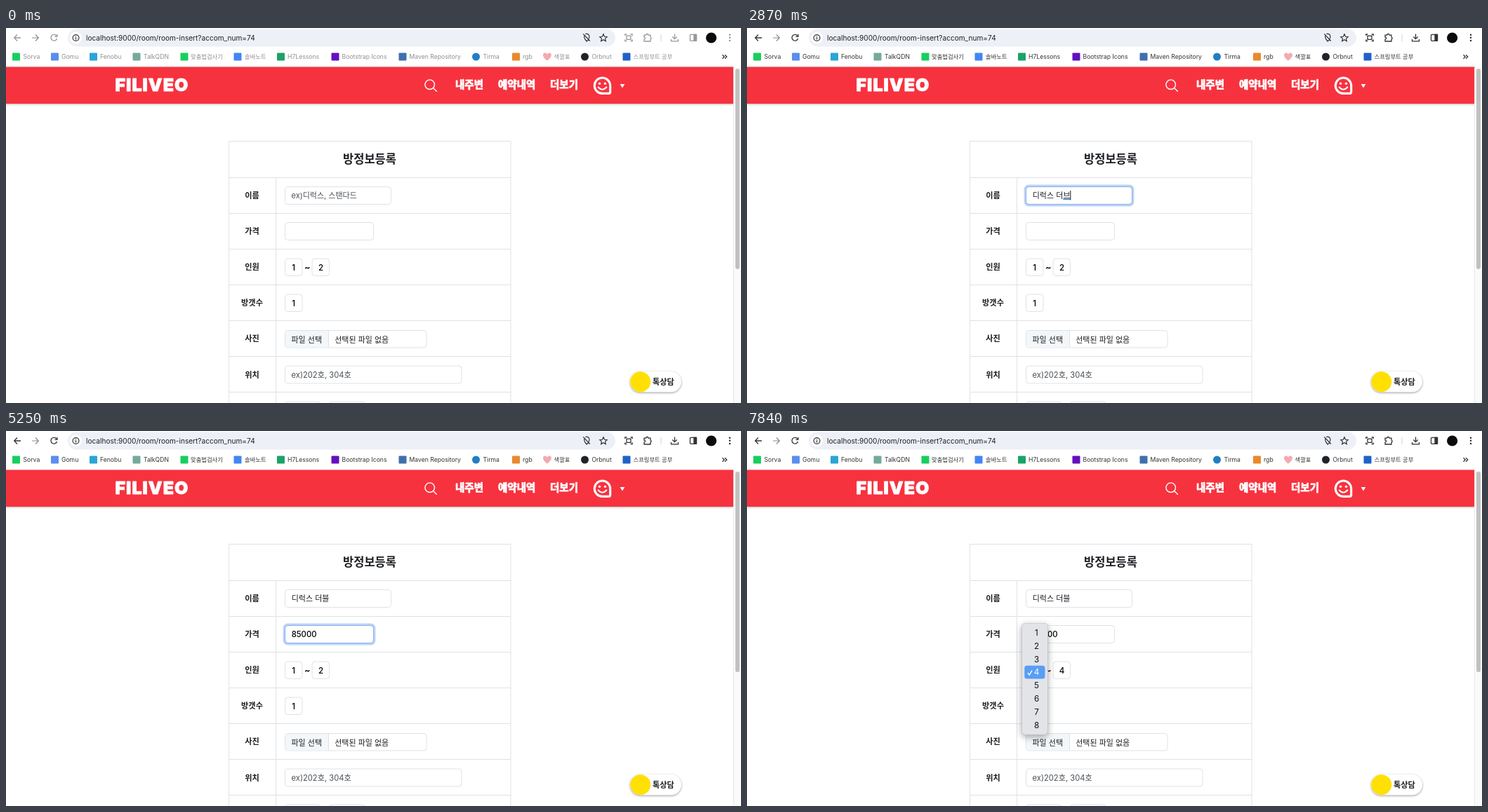
An HTML page for the animation above (8000 ms loop, 1047 px wide and 535 px high).

```html
<!DOCTYPE html>
<html lang="ko">
<head>
<meta charset="utf-8">
<title>방정보등록</title>
<style>
  html, body { margin: 0; width: 100%; height: 100%; overflow: hidden; background: #fff; }
  svg { display: block; width: 100%; height: 100%; font-family: Inter, 'Noto Sans CJK KR', 'Noto Sans CJK', sans-serif; }
  text { white-space: pre; }
</style>
</head>
<body>
<svg id="stage" viewBox="0 0 1047 535"></svg>
<script>
const LOOP = 8000;
const LINE = '#dee2e6', INK = '#1b1e22', HINT = '#4b5055';

// Markup helpers
const attrs = o => Object.entries(o).map(([k, v]) => ` ${k}="${v}"`).join('');
const el = (tag, o, inner = '') => `<${tag}${attrs(o)}>${inner}</${tag}>`;
const text = (x, y, str, size, o = {}) => el('text', { x, y, 'font-size': size, fill: INK, ...o }, str);
const rect = (x, y, width, height, rx = 0, o = {}) => el('rect', { x, y, width, height, rx, ...o });
const disc = (cx, cy, r, o = {}) => el('circle', { cx, cy, r, ...o });
const path = (d, o = {}) => el('path', { d, fill: 'none', ...o });
const group = (id, inner, o = {}) => el('g', { id, ...o }, inner);
const middle = { 'text-anchor': 'middle' };
const number = { fill: '#000', 'font-weight': 500 };

const field = (x, y, w, h = 25) => rect(x, y, w, h, 4, { fill: '#fff', stroke: LINE });
const ring = (id, x, y, w, h = 25) => group(id,
  rect(x - 1.4, y - 1.4, w + 2.8, h + 2.8, 5, { stroke: '#0d5cdb', 'stroke-opacity': .27, 'stroke-width': 3 }) +
  rect(x, y, w, h, 4, { stroke: '#86b0f4' }), { fill: 'none' });

function toolbar() {
  const faded = path('M21 14H12M16 9.5L11.7 14L16 18.5M72 11.2A4.4 4.4 0 1 0 72.6 15M72.9 9V12.3H69.5') +
    path('M881.8 11V9H884.3M889.7 9H892.2V11M881.8 16.5V18.5H884.3M889.7 18.5H892.2V16.5') +
    rect(884, 11.2, 6, 5.2, 0, { fill: 'none' }) +
    path('M909 10.2H911.6A1.7 1.7 0 0 1 915 10.2H918V13A1.7 1.7 0 0 1 918 16.2V19H909V16.2A1.6 1.6 0 0 0 909 13Z') +
    path('M952.5 8.5V15.5M949.3 12.5L952.5 15.7L955.7 12.5M947.5 16V18.8H957.5V16') +
    rect(974.5, 9.3, 9, 9, 1, { fill: 'none' }) +
    rect(980, 9.3, 3.5, 9, 0, { fill: '#333' }) +
    [9.7, 13.8, 17.9].map(y => disc(1031, y, .6, { fill: '#333' })).join('');
  return rect(88, 1.5, 780, 25, 12.5, { fill: '#eef0f7' }) +
    disc(99.5, 14, 8.5, { fill: '#fff' }) +
    text(114, 17.5, 'localhost:9000/room/room-insert?accom_num=74', 10.1, { fill: '#1f1f1f' }) +
    group('tools', faded, { stroke: '#333', 'stroke-width': 1.3 }) +
    path('M37 14H46M42 9.5L46.3 14L42 18.5', { stroke: '#8b8b8b', 'stroke-width': 1.2 }) +
    el('g', { stroke: '#333', 'stroke-width': 1.2, fill: 'none' },
      disc(99.5, 14, 4.4) + path('M99.5 13.3V16.5M99.5 11.4V12.4') +
      path('M824.2 10.2C822.4 13 825 16.5 827.2 19C829.6 16.5 832 13.3 830.6 10.5C829.3 8 826.8 7.8 825.4 8.8M822.2 8.3L831.8 18.5') +
      path('M851 8.8L852.6 12.3L856.2 12.7L853.5 15.1L854.3 18.7L851 16.8L847.7 18.7L848.5 15.1L845.8 12.7L849.4 12.3Z')) +
    path('M933 9V19', { stroke: '#cfd3dc' }) + disc(1004.6, 14, 7.6, { fill: '#0b0b0b' });
}

function bookmarks() {
  const items = [
    [14.5, 24.5, 'Sorva', '#19ce60'], [69.5, 79, 'Gomu', '#5b8def'], [124.5, 134, 'Fenobu', '#2aa5d8'],
    [186, 196, 'TalkQDN', '#75a99c'], [254, 263, '맞춤법검사기', '#19ce60'], [330, 340, '솔바노트', '#4285f4'],
    [391.5, 401, 'H7Lessons', '#1aa367'], [469, 478.5, 'Bootstrap Icons', '#6310c0'],
    [565, 574.5, 'Maven Repository', '#3f6fae'], [669.5, 679.5, 'Tirma', '#1f7fc4', 1],
    [726.5, 736, 'rgb', '#e8892b'], [771, 780.5, '색깔표', ''],
    [824.5, 834.5, 'Orbnut', '#1f2328', 1], [884, 893.5, '스프링부트 공부', '#1e62c8']
  ];
  const icons = items.map(([x, , , fill, round]) => !fill ? '' :
    round ? disc(x, 41, 5.5, { fill }) : rect(x - 5.5, 35.5, 11, 11, 1, { fill })).join('');
  const heart = path('M771 46.5C762 40 765 35 768.5 35.5Q770.3 35.8 771 37.6Q771.7 35.8 773.5 35.5C777 35 780 40 771 46.5Z', { fill: '#f4a9b0' });
  const names = items.map(([, x, name]) => text(x, 44, name, /[가-힣]/.test(name) ? 8.3 : 8.65, { fill: '#333' })).join('');
  return icons + heart + group('names', names) +
    path('M1020.5 38.3L1023.2 41L1020.5 43.7M1024 38.3L1026.7 41L1024 43.7', { stroke: '#333', 'stroke-width': 1.3 });
}

function header() {
  const heavy = { fill: '#fff', 'font-weight': 900, stroke: '#fff', 'stroke-width': .8, 'stroke-linejoin': 'round' };
  return rect(0, 55.5, 1036.5, 52.5, 0, { fill: '#f7323f', style: 'filter:drop-shadow(0 1px 1.5px #0004)' }) +
    text(155.5, 90.3, 'FILIVEO', 25, { ...heavy, 'letter-spacing': 1 }) +
    el('g', { stroke: '#fff', fill: 'none', 'stroke-width': 1.4, 'stroke-linecap': 'round' },
      disc(603.7, 80.7, 6.8) + path('M608.7 85.7L613.4 90.3')) +
    text(640, 85.5, '내주변', 14.5, heavy) + text(701, 85.5, '예약내역', 14.5, heavy) +
    text(775, 85.5, '더보기', 14.5, heavy) +
    path('M849.5 71A11.2 11.2 0 1 0 849.5 93.4H858.5Q860.7 93.4 860.7 91V82.2A11.2 11.2 0 0 0 849.5 71Z', { stroke: '#fff', 'stroke-width': 3.1 }) +
    disc(845.5, 79.3, 1.7, { fill: '#fff' }) + disc(853.5, 79.3, 1.7, { fill: '#fff' }) +
    path('M843.7 84.5Q849.5 91 855.3 84.5', { stroke: '#fff', 'stroke-width': 2.2, 'stroke-linecap': 'round' }) +
    path('M874.7 80H881.3L878 85.4Z', { fill: '#fff' });
}

function form() {
  const rows = [213.5, 264.5, 315.5, 366.5, 417.5, 468.5, 519.5];
  const labels = ['이름', '가격', '인원', '방갯수', '사진', '위치'];
  const grid = 'M317.5 535V161.5H719V535M384.5 213.5V535' + rows.map(y => `M317.5 ${y}H719`).join('');
  return path(grid, { stroke: LINE }) +
    text(518, 193.3, '방정보등록', 16.5, { ...middle, 'font-weight': 700 }) +
    labels.map((s, i) => text(350.5, 243 + i * 51.1, s, 11.2, { ...middle, 'font-weight': 700 })).join('') +
    field(397.5, 226.5, 151) + field(397.5, 277.5, 126) +
    field(397.5, 329, 24.5, 24.5) + field(436, 329, 24.5, 24.5) + field(397.5, 380, 24.5, 24.5) +
    field(397.5, 431.5, 201.5, 24.5) +
    path('M459 432H401.5Q398 432 398 435.5V452Q398 455.5 401.5 455.5H459Z', { fill: '#f4f7f9' }) +
    path('M459.5 432V455.5', { stroke: LINE }) +
    field(397.5, 482, 251.5, 25) + field(397.5, 533, 50, 25) + field(461, 533, 50, 25) +
    text(425, 345.5, '~', 12.5, { 'font-weight': 700 }) +
    text(406.5, 448.5, '파일 선택', 11) + text(468.2, 448.5, '선택된 파일 없음', 11) +
    text(406.5, 498.5, 'ex)202호, 304호', 11.2, { fill: HINT }) +
    text(409.7, 397.3, '1', 11.5, { ...middle, ...number }) +
    text(409.7, 346.3, '1', 11.5, { ...middle, ...number, id: 'low' }) +
    text(448.5, 346.3, '2', 11.5, { ...middle, ...number, id: 'high' }) +
    ring('ringName', 397.5, 226.5, 151) + ring('ringPrice', 397.5, 277.5, 126) + ring('ringLow', 397.5, 329, 24.5, 24.5) +
    text(406.5, 242.7, 'ex)디럭스, 스탠다드', 11, { fill: HINT, id: 'hint' }) +
    text(406.7, 242.7, '', 11, { id: 'name' }) + text(406.7, 294.3, '', 11.3, { ...number, id: 'price' }) +
    rect(0, 243.6, 0, 1.4, 0, { id: 'under', fill: '#2b6fd6' }) +
    rect(0, 0, 1, 13.5, 0, { id: 'caret', fill: '#111' }) +
    path('M480 232Q482.5 232 482.5 234V245Q482.5 247 480 247M485 232Q482.5 232 482.5 234M482.5 245Q482.5 247 485 247', { id: 'beam', stroke: '#333' });
}

const chat = () => rect(889, 490, 73, 29.5, 14.7, { fill: '#fff', style: 'filter:drop-shadow(0 1px 1.5px #0006)' }) +
  disc(903.7, 504.7, 14.5, { fill: '#ffe000' }) + text(921, 508.7, '톡상담', 11.2, { 'font-weight': 700 });

const scrollbar = () => rect(1036.5, 56, 10.5, 479, 0, { fill: '#fafafa' }) +
  path('M1036.5 56V535', { stroke: '#e8e8e8' }) + rect(1039, 58, 6, 286, 3, { fill: '#c1c1c1' });

// Autofill list with a small pointer on top
function suggest(x, y, items, size) {
  const h = items.length * 26.2 + 6;
  return el('g', { fill: '#fff', style: 'filter:drop-shadow(0 1px 1px #0004)' },
    rect(x, y, 114, h, 3) + path(`M${x + 10.5} ${y + .5}L${x + 15.5} ${y - 4.5}L${x + 20.5} ${y + .5}Z`, { fill: '#fff' })) +
    items.map((s, i) => text(x + 8.8, y + 19.2 + i * 26.2, s, size, { fill: '#111' })).join('');
}

function menu(y, checked, lit) {
  let out = rect(391.5, y, 37, 159, 5, { fill: '#e3e4e8', stroke: '#b9bbc0', 'stroke-width': .6, style: 'filter:drop-shadow(0 3px 5px #0005)' });
  for (let n = 1; n <= 8; n++) {
    const cy = y + 13.2 + (n - 1) * 18.9, color = n === lit ? '#fff' : '#111';
    if (n === lit) out += rect(395.3, cy - 9.4, 29.2, 18.8, 3.5, { fill: '#589df6' });
    if (n === checked) out += path(`M400 ${cy + .8}L402.2 ${cy + 3.8}L406 ${cy - 2.6}`, { stroke: color, 'stroke-width': 1.4 });
    out += text(412.5, cy + 4.2, n, 11.7, { ...middle, fill: color });
  }
  return out;
}

const stage = document.getElementById('stage');
stage.innerHTML = rect(0, 0, 1047, 535, 0, { fill: '#fff' }) + toolbar() + bookmarks() +
  form() + header() + scrollbar() + chat() + group('list', '') + group('menu', '');
const $ = Object.fromEntries([...stage.querySelectorAll('[id]')].map(e => [e.id, e]));

// Timelines: [start, value]
const rooms = ['', ' 더블', ' 더블 항구전망', ' 트리플', ' 트윈 비전망', ' 패밀리'].map(s => '디럭스' + s);
const typed = [[0, ''], [1400, 'ㄷ'], [1610, '디'], [1750, '딜'], [1960, '디러'], [2030, '디럭'], [2100, '디럯'],
  [2170, '디럭스'], [2380, '디럭스 '], [2520, '디럭스 ㄷ'], [2660, '디럭스 더'], [2800, '디럭스 덥'],
  [2870, '디럭스 더브'], [3080, '디럭스 더블']];
const digits = [[0, ''], [4200, '8'], [4340, '85'], [4480, '850'], [4620, '8500'], [4760, '85000']];
const lists = [[0, 0], [1680, 6], [1820, 0], [2030, 6], [2100, 0], [2240, 6], [2450, 5], [2590, 0], [2730, 2],
  [2800, 0], [3080, 2], [4200, -2], [4340, -1], [4760, 0]];
const carets = [[0, 0], [700, 1], [1260, 0], [1400, 1], [4060, 0], [4200, 1], [5250, 0], [5810, 1], [6160, 0]];
const lits = [[0, 0], [6230, 1], [6510, 2], [6650, 3], [6790, 4], [7140, 0], [7210, 4]];

const at = (steps, t) => steps.reduce((v, [start, val]) => t >= start ? val : v, steps[0][1]);
const ramp = (t, a, d = 150) => {
  const p = Math.min(1, Math.max(0, (t - a) / d));
  return p * p * (3 - 2 * p);
};
const set = (e, o) => { for (const k in o) e.setAttribute(k, o[k]); };
const fill = (e, html) => { if (e.last !== html) e.innerHTML = e.last = html; };
const width = e => e.textContent ? e.getComputedTextLength() : 0;

function render(t) {
  const active = t >= 700;
  set($.tools, { opacity: active ? 1 : .5 });
  set($.names, { opacity: active ? 1 : .55 });
  set($.ringName, { opacity: ramp(t, 700) * (1 - ramp(t, 3570)) });
  set($.ringPrice, { opacity: ramp(t, 3570) * (1 - ramp(t, 6160)) });
  set($.ringLow, { opacity: ramp(t, 6160) });

  const name = at(typed, t);
  fill($.name, name);
  fill($.price, at(digits, t));
  set($.hint, { opacity: name ? 0 : 1 });

  const composing = name && !name.endsWith(' ') && t < 3570;
  const nameW = width($.name);
  const lastW = composing ? $.name.getSubStringLength(name.length - 1, 1) : 0;
  set($.under, { x: 406.7 + nameW - lastW, width: lastW });
  const onName = t < 3570;
  set($.caret, { x: 406.6 + (onName ? nameW : width($.price)), y: onName ? 232 : 283.3, opacity: at(carets, t) });
  set($.beam, { opacity: t >= 5530 && t < 5600 ? 1 : 0 });

  const n = at(lists, t);
  const shown = n === 6 ? rooms : n === 5 ? rooms.slice(1) : rooms.slice(1, 3);
  fill($.list, n > 0 ? suggest(457, 258, shown, 9) : n < 0 ? suggest(444.7, 309, ['85000', '80000'].slice(0, -n), 9.5) : '');

  fill($.low, t >= 7280 ? '4' : '1');
  fill($.high, t >= 7280 ? '4' : '2');
  const reopened = t >= 7840;
  const open = t >= 6160 && t < 7490;
  fill($.menu, reopened ? menu(274.3, 4, 4) : open ? menu(331, 1, at(lits, t)) : '');
  set($.menu, { opacity: reopened ? 1 : 1 - ramp(t, 7260, 230) });
}

const begin = performance.now();
function tick(now) {
  render(Math.max(0, now - begin) % LOOP);
  requestAnimationFrame(tick);
}
render(0);
requestAnimationFrame(tick);
</script>
</body>
</html>
```
